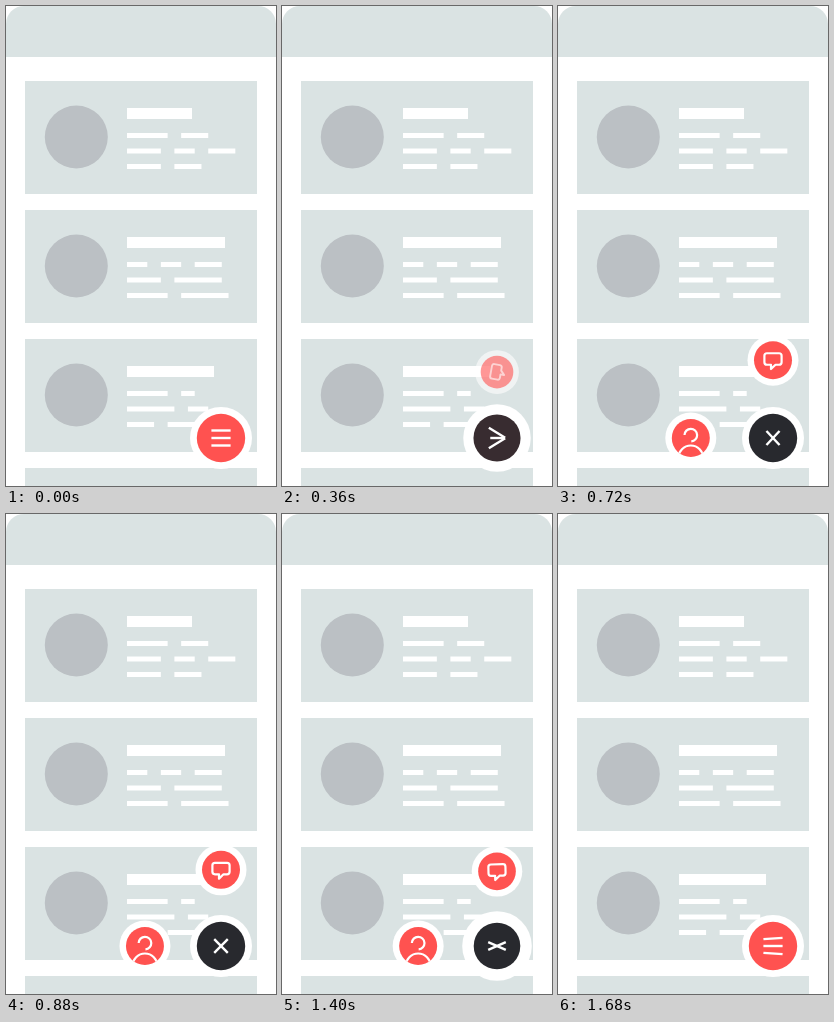
Write an HTML page with a canvas that moves like this. It is 270 px wide and 480 px high and loops after 1.72 s.

```html
<!DOCTYPE html>
<html lang="en">
<head>
<meta charset="utf-8">
<title>Floating action button</title>
<style>
  html, body { margin: 0; height: 100%; overflow: hidden; background: #fff; }
  canvas { display: block; width: 270px; height: 480px; }
</style>
</head>
<body>
<canvas id="stage" width="270" height="480"></canvas>
<script>
const ctx = document.getElementById('stage').getContext('2d');
const LOOP = 1720, STEP = 40, OPEN = 240, CLOSE = 1340;
const RED = [255, 82, 80], DARK = [40, 41, 46], PALE = '#dae3e3';

// Every word is a line of text, every digit a bar that many units wide.
const UNIT = 6.77;
const cards = ['64 534 54', '334 57 67', '62 73 46', ''];

const bubble = new Path2D('M-6-7H6Q8.6-7 8.6-4.5V2Q8.6 4.5 6 4.5H2.5L-2 8.8V4.5H-6Q-8.6 4.5-8.6 2V-4.5Q-8.6-7-6-7Z');
const person = new Path2D('M-6.3-3A6.3 6.3 0 1 1 .5 3.4M-12.5 20A12.5 12.5 0 0 1 12.5 20');

const progress = (t, start, length) => Math.min(1, Math.max(0, (t - start) / length));
const easeOut = p => 1 - (1 - p) ** 3;
const backOut = p => 1 + 2.7 * (p - 1) ** 3 + 1.7 * (p - 1) ** 2;
const pulse = (t, start) => Math.sin(Math.PI * progress(t, start, 200)) ** 2;

function disc(x, y, r, color) {
  ctx.fillStyle = color;
  ctx.beginPath();
  ctx.arc(x, y, r, 0, 2 * Math.PI);
  ctx.fill();
}

function drawCard(text, index) {
  const top = 75 + 129 * index;
  ctx.fillStyle = PALE;
  ctx.fillRect(19, top, 232, 113);
  disc(70.3, top + 56, 31.5, '#bbc0c4');
  ctx.fillStyle = '#fff';
  ctx.fillRect(121, top + 27, 65 + 33 * index / (index * index * .75 - .25 * index + .5), 11);
  text.split(' ').forEach((line, row) => {
    let x = 121;
    for (const units of line) {
      ctx.fillRect(x, top + 52 + 15.5 * row, units * UNIT, 5);
      x += (+units + 2) * UNIT;
    }
  });
}

function drawPage() {
  ctx.fillStyle = '#fff';
  ctx.fillRect(0, 0, 270, 480);
  ctx.fillStyle = PALE;
  ctx.beginPath();
  ctx.roundRect(0, 0, 270, 51, [18, 18, 0, 0]);
  ctx.fill();
  cards.forEach(drawCard);
}

// A small button that springs out of the main one along (dx, dy).
function drawOption(t, delay, dx, dy, icon) {
  const age = t - OPEN - delay;
  const closing = progress(t, CLOSE + delay * .6, 300);
  if (age <= 0 || closing === 1) return;
  const shown = easeOut(progress(age, 0, 250));
  const wobble = 9 * Math.exp(-age / 600) * Math.cos(2 * Math.PI * age / 600);
  const distance = shown * (79 - wobble) * (1 - closing ** 2);
  const scale = shown * (1 - closing ** 3);
  ctx.save();
  ctx.globalAlpha = progress(age, 0, 200) * (1 - closing ** 3);
  ctx.translate(215 + dx * distance, 432 + dy * distance);
  ctx.scale(scale, scale);
  disc(0, 0, 25.5, '#fff');
  disc(0, 0, 19, `rgb(${RED})`);
  ctx.clip();
  ctx.rotate(-Math.PI * ((1 - progress(age, 0, 360)) ** 2 + closing ** 3));
  ctx.lineWidth = 2.2;
  ctx.stroke(icon);
  ctx.restore();
}

function drawBar(y, angle, half) {
  ctx.save();
  ctx.translate(0, y);
  ctx.rotate(angle);
  ctx.beginPath();
  ctx.moveTo(-half, 0);
  ctx.lineTo(half, 0);
  ctx.stroke();
  ctx.restore();
}

function drawMain(t) {
  const dark = easeOut(progress(t, OPEN - 20, 240)) * (1 - progress(t, CLOSE + 60, 160));
  const color = RED.map((c, i) => Math.round(c + (DARK[i] - c) * dark));
  const swell = pulse(t, OPEN - 20) + pulse(t, CLOSE - 20);
  const crossed = t < CLOSE ? t > OPEN && backOut(progress(t, OPEN, 600))
    : 1 - backOut(progress(t, CLOSE, 500));
  const angle = Math.PI / 4 * crossed;
  const spread = 1 - (progress(t, OPEN, 220) - progress(t, CLOSE + 60, 160)) ** 2;
  ctx.save();
  ctx.translate(215, 432);
  disc(0, 0, 31 + 4.2 * swell, '#fff');
  disc(0, 0, 24.2 - swell, `rgb(${color})`);
  ctx.lineWidth = 2.4;
  drawBar(-7.5 * spread, angle, 9.6);
  drawBar(0, 0, 9.6 * spread);
  drawBar(7.5 * spread, -angle, 9.6);
  ctx.restore();
}

let start;
function tick(now) {
  start ??= now;
  const t = Math.floor((now - start) % LOOP / STEP) * STEP;
  ctx.strokeStyle = '#fff';
  ctx.lineJoin = 'round';
  drawPage();
  drawOption(t, 0, 0, -1, bubble);
  drawOption(t, 100, -1, 0, person);
  drawMain(t);
  requestAnimationFrame(tick);
}
requestAnimationFrame(tick);
</script>
</body>
</html>
```
